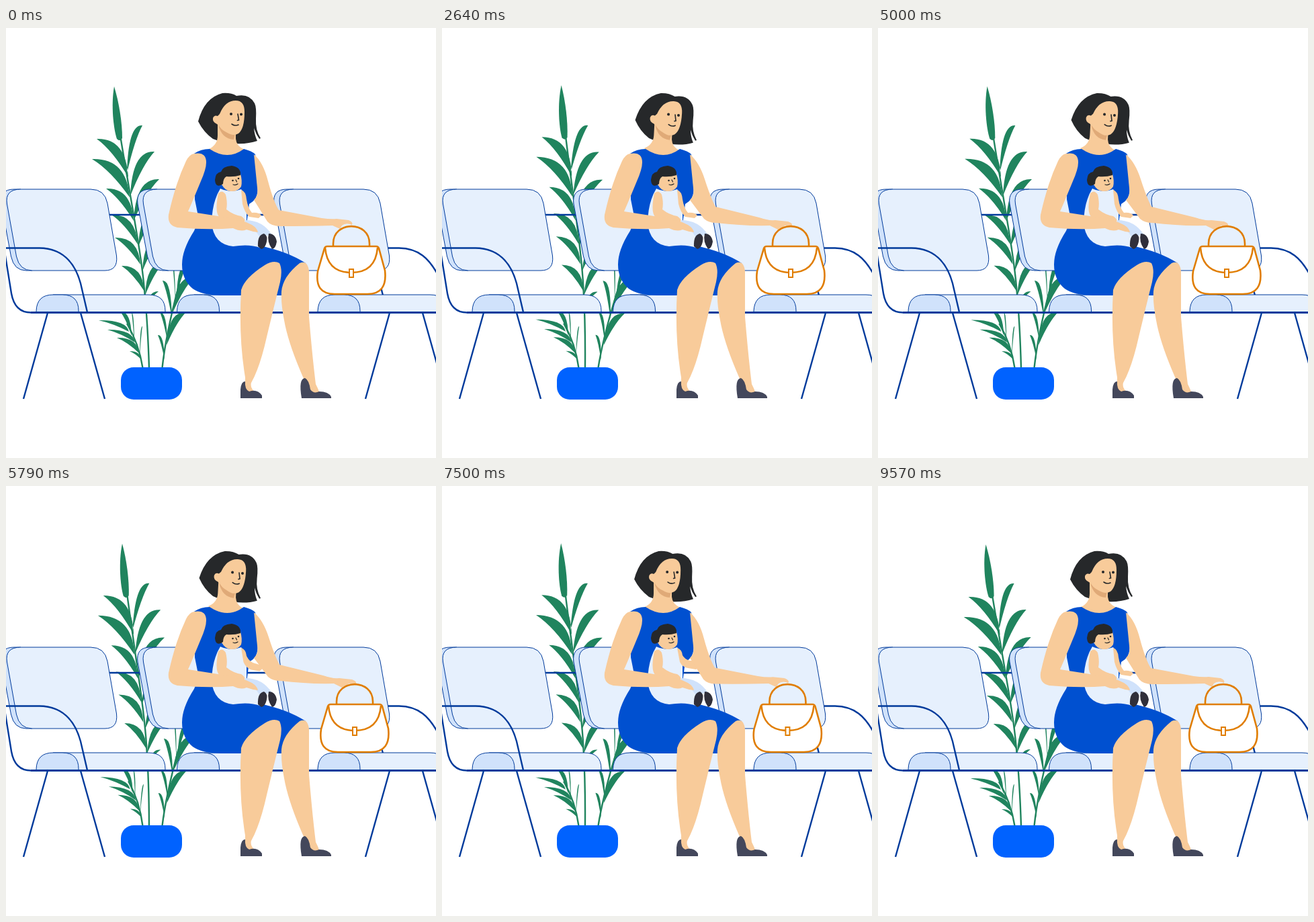
These frames come from a looping animation (640 by 640 pixels, 9640 ms). An HTML page:

```html
<!DOCTYPE html>
<html lang="en">
<head>
<meta charset="utf-8">
<title>Waiting room</title>
<style>
  html, body { margin: 0; width: 100%; height: 100%; overflow: hidden; background: #fff; }
  svg { display: block; width: 100vw; height: 100vh; }
  .line { fill: none; stroke: #003a9b; stroke-width: 2.4; }
  .pad { fill: #e6f0fd; stroke: #003a9b; stroke-width: 1; }
  .side { fill: #d0e2fb; stroke: #003a9b; stroke-width: 1; }
  .green { fill: #20845e; }
  .stem { fill: none; stroke: #20845e; stroke-width: 2.4; }
  .skin { fill: #f8cb9a; }
  .hair { fill: #26282a; }
  .dress { fill: #0050d0; }
  .shoe { fill: #43475b; }
  .mark { fill: none; stroke: #26282a; stroke-width: 1.6; stroke-linecap: round; }
  .bag { fill: none; stroke: #e07d00; stroke-width: 2.6; }
</style>
</head>
<body>
<svg viewBox="0 0 640 640">
  <defs>
    <g id="back">
      <path class="side" d="M12 240H22L39 361H30Q12 361 7.500 340L-7 262Q-10 240 12 240Z"/>
      <path class="pad" d="M22 240H126Q147 240 151 261L164.500 339Q167 361 147 361H39Q20 361 15.500 340L1.500 262Q-2 240 22 240Z"/>
    </g>
    <g id="seat">
      <path class="pad" d="M70 397H212Q237 397 237 421V423H45Z"/>
      <path class="side" d="M45 423V421Q46 397 70 397H84Q108 397 108 421V423Z"/>
    </g>
    <path id="legs" class="line" d="M62 424L26 552M111 424L147 552"/>
  </defs>

  <g id="main">
    <path class="stem" d="M213 506Q211 440 206 390C202 340 188 270 170 160"/>
    <path class="green" d="M161 87C156 115 160 150 165 165Q170 170 173 164C173 140 168 110 161 87Z"/>
  </g>
  <g id="left"><path class="stem" d="M203.500 506Q198 470 180 440"/></g>
  <g id="right"><path class="stem" d="M232.500 506Q238 455 258 380"/></g>
  <rect x="171" y="505" width="91" height="48" rx="19" fill="#0062ff"/>

  <path class="line" d="M152 278H210M350 278H420M557 382L561 398"/>
  <path class="line" d="M569 327.500H585C615 328 630 344 642 366"/>
  <use href="#back"/><use href="#back" x="203"/><use href="#back" x="406"/>
  <use href="#seat"/><use href="#seat" x="209.500"/><use href="#seat" x="419"/>
  <use href="#legs"/><use href="#legs" x="509"/>
  <path class="line" d="M-5 327.500H50C90 328 105 358 111 380L121 423M-3 327L8 395Q13 423.500 37 423.500"/>
  <path class="line" style="stroke-width:2.800" d="M37 423.500H642"/>

  <g id="head">
    <path class="hair" d="M286 139Q295 104 322 97Q335 96 343 101Q362 97 370 112Q373 118 372 135Q371 152 379 164L377 165Q372 158 369 149Q370 160 374 168Q360 173 341 172Q325 172 308 165Q294 155 286 139Z"/>
    <path class="skin" d="M302 180Q315 174 315 160V135L342 150V165Q343 176 355 181L345 196H312Z"/>
    <path fill="#e0aa78" d="M316 144Q324 158 341 157L339 166Q321 165 316 144Z"/>
    <path class="skin" d="M318 128Q326 108 342 108Q355 108 355 125Q355 150 346 157Q338 162 328 155L314 143Q307 140 308 134Q310 129 315 131Z"/>
    <circle class="hair" cx="335" cy="128" r="2"/><circle class="hair" cx="350" cy="128.500" r="2"/>
    <path class="mark" d="M345 128L346.500 137L344.500 137.500M336 143Q341 146.500 346 144"/>
  </g>

  <path class="dress" d="M280 187Q290 180 303 180Q330 198 354 180Q366 183 371 188L374.500 240Q375 255 362 262L357 300L378 324Q420 333 446 350L430 390L410 398H320Q292 398 278 388Q262 375 262 352Q262 330 280 302L287 285L281 255V230Z"/>
  <path class="skin" d="M350 390Q355 372 385 353Q398 345 407 350Q412 360 408 378Q400 410 388 460Q378 505 365 528Q363 535 370 542L356 543V520Q346 460 350 390Z"/>
  <path class="skin" d="M410 392Q412 370 437 350Q449 345 451 362V430Q456 490 461 530Q466 540 466 542Q455 547 450 538L444 524Q420 470 414 435Q409 410 410 392Z"/>
  <path class="shoe" d="M349 551V538Q350 526 356 526Q355 538 362 541Q374 537 381 547V551Z"/>
  <path class="shoe" d="M440 551Q435 522 445 521Q451 524 453 538Q458 545 466 541Q480 541 484 549V551Z"/>

  <path fill="#e6f0fd" d="M319 239Q307 258 306 290Q309 322 338 325Q362 321 378 327L388 306Q380 290 358 287V262Q355 245 350 240Q335 246 319 239Z"/>
  <path fill="#d0e2fb" d="M356 286Q382 286 396 308L377 310Q370 298 356 292Z"/>
  <path fill="#302f3a" d="M375 325Q374 308 384 306Q390 309 388 318Q386 328 380 329ZM391 306Q401 306 403 318Q401 329 396 329Q388 318 391 306Z"/>
  <path id="babyRight" class="skin"/>
  <path id="babyLeft" class="skin"/>
  <g id="babyHead">
    <path class="skin" d="M322 220Q330 220 349 217Q352 228 350 236Q345 244 334 243Q326 242 321 233Z"/>
    <path class="hair" d="M311 226Q312 215 320 214Q322 206 336 205Q350 207 349 219Q340 222 328 221Q323 224 323 232Q318 236 314 234Q311 231 311 226Z"/>
    <circle class="hair" cx="337.500" cy="227" r="1.300"/><circle class="hair" cx="346" cy="224" r="1.300"/>
    <path class="mark" style="stroke-width:1.200" d="M342 226L343.500 229M338 233Q342 234.500 345 232"/>
  </g>

  <path id="reach" class="skin"/>
  <path class="skin" d="M280 187Q298 184 298 200Q298 210 290 228Q276 262 271 273L335 283Q340 287 350 286Q360 290 366 293Q374 298 375 304Q366 303 358 300Q350 304 338 298Q300 301 255 297Q240 294 242 278Q252 232 268 198Q273 188 280 187Z"/>

  <g id="bag" class="bag">
    <path d="M487 325V321C487 286.500 541 286.500 541 321V325"/>
    <path fill="#fff" d="M478 325H551Q554 325 555 328L564 361Q568 396 538 396H489Q459 396 464 362L474 328Q475 325 478 325Z"/>
    <path d="M475 327Q478 364 514 364Q550 364 553 327"/>
    <rect x="511" y="359" width="6" height="12" fill="#fff" style="stroke-width:2"/>
  </g>
</svg>
<script>
const LOOP = 9640, SWAY = LOOP / 2;
const $ = id => document.getElementById(id);

// Each leaf: stem point, then tip
const leaves = {
  main: [
    [182, 222, 135, 165], [184, 252, 128, 195], [190, 287, 149, 239], [196, 322, 157, 278],
    [200, 352, 162, 312], [206, 392, 172, 354], [180, 216, 203, 145], [185, 250, 221, 184],
    [190, 287, 228, 225], [197, 325, 230, 268], [203, 362, 232, 310], [207, 398, 234, 350],
    [212, 410, 227, 392]
  ],
  left: [
    [183, 452, 138, 435], [192, 468, 151, 449], [198, 484, 165, 461], [201, 493, 184, 481],
    [187, 458, 170, 422], [191, 470, 187, 424], [199, 490, 203, 444]
  ],
  right: [
    [247, 432, 233, 376], [252, 408, 248, 352], [240, 465, 229, 423], [236, 494, 226, 457],
    [249, 422, 281, 370], [239, 472, 268, 423], [254, 398, 271, 350]
  ]
};
for (const id in leaves) {
  const d = leaves[id].map(([x, y, tx, ty]) => {
    const dx = tx - x, dy = y - ty;
    return `M${x} ${y}Q${x + dx * .08} ${ty - dy * .03} ${tx} ${ty}Q${x + dx * .5} ${ty + dy * .3} ${x} ${y}Z`;
  }).join('');
  const p = document.createElementNS('http://www.w3.org/2000/svg', 'path');
  p.setAttribute('class', 'green');
  p.setAttribute('d', d);
  $(id).append(p);
}

const reach = [
  'M369 188Q383 200 390 228Q398 258 406 271L470 283Q484 285 492 284L510 286Q517 289 515 293Q506 289 500 294L497 299L486 294Q450 295 408 295Q395 295 389 288L369 256Q376 250 374 238Z',
  'M369 188Q383 200 391 225Q400 253 407 266L472 282Q486 287 496 286L515 288Q523 291 521 295Q511 292 508 296L502 301L488 294Q450 295 408 290Q397 290 390 284L369 256Q376 250 374 238Z'
];
const babyLeft = [
  'M316 246Q322 240 327 248Q330 260 328 270Q338 278 350 280Q357 285 355 288L347 288Q330 284 318 282Q310 275 316 246Z',
  'M318 246Q324 240 330 249Q332 260 331 271Q340 271 349 271Q357 267 358 272L350 277Q338 283 322 281Q311 275 318 246Z'
];
const babyRight = [
  'M350 241Q357 243 358 255Q360 268 366 275Q376 274 380 279L376 283L362 281Q355 274 352 262Z',
  'M352 244Q359 248 360 260Q363 272 368 278Q375 284 376 289L371 288L358 277Q354 270 354 258Z',
  'M350 241Q357 243 358 252Q363 260 372 260Q379 262 384 268L378 273L366 271Q358 270 354 262Z'
];

const mix = (a, b, k) => {
  const to = b.match(/[\d.]+/g);
  let i = 0;
  return a.replace(/[\d.]+/g, n => +n + (to[i++] - n) * k);
};
const wave = x => (1 - Math.cos(2 * Math.PI * x)) / 2;
const ease = (t, from, to) => wave(Math.min(1, Math.max(0, (t - from) / (to - from))) / 2);
const move = (id, v) => $(id).setAttribute('transform', v);
const shape = (id, d) => $(id).setAttribute('d', d);

function sway(id, t, low, deg, x) {
  const a = (wave((t - low) / SWAY) - wave(low / SWAY)) * deg;
  move(id, `rotate(${a} ${x} 505)`);
}

function draw(now) {
  const t = now % LOOP;
  sway('main', t, 4400, 3, 213);
  sway('left', t, 4000, 3.2, 203);
  sway('right', t, 4900, 2.9, 233);

  const lean = ease(t, 0, 1200) - ease(t, 6200, 7800);
  move('head', `rotate(${lean * 3.1} 325 166)`);
  move('bag', `translate(${lean * 5} 0)`);
  shape('reach', mix(...reach, lean));

  const clap = t > 200 && t < 5000 ? wave((t - 200) / 2400) : 0;
  const lift = ease(t, 5000, 6200) - ease(t, 8450, 9600);
  move('babyHead', `translate(${clap * 3.5} 0) rotate(${clap * 2} 335 240)`);
  shape('babyLeft', mix(...babyLeft, clap));
  shape('babyRight', mix(babyRight[0], babyRight[lift ? 2 : 1], lift || clap));
  requestAnimationFrame(draw);
}
draw(performance.now());
</script>
</body>
</html>
```
